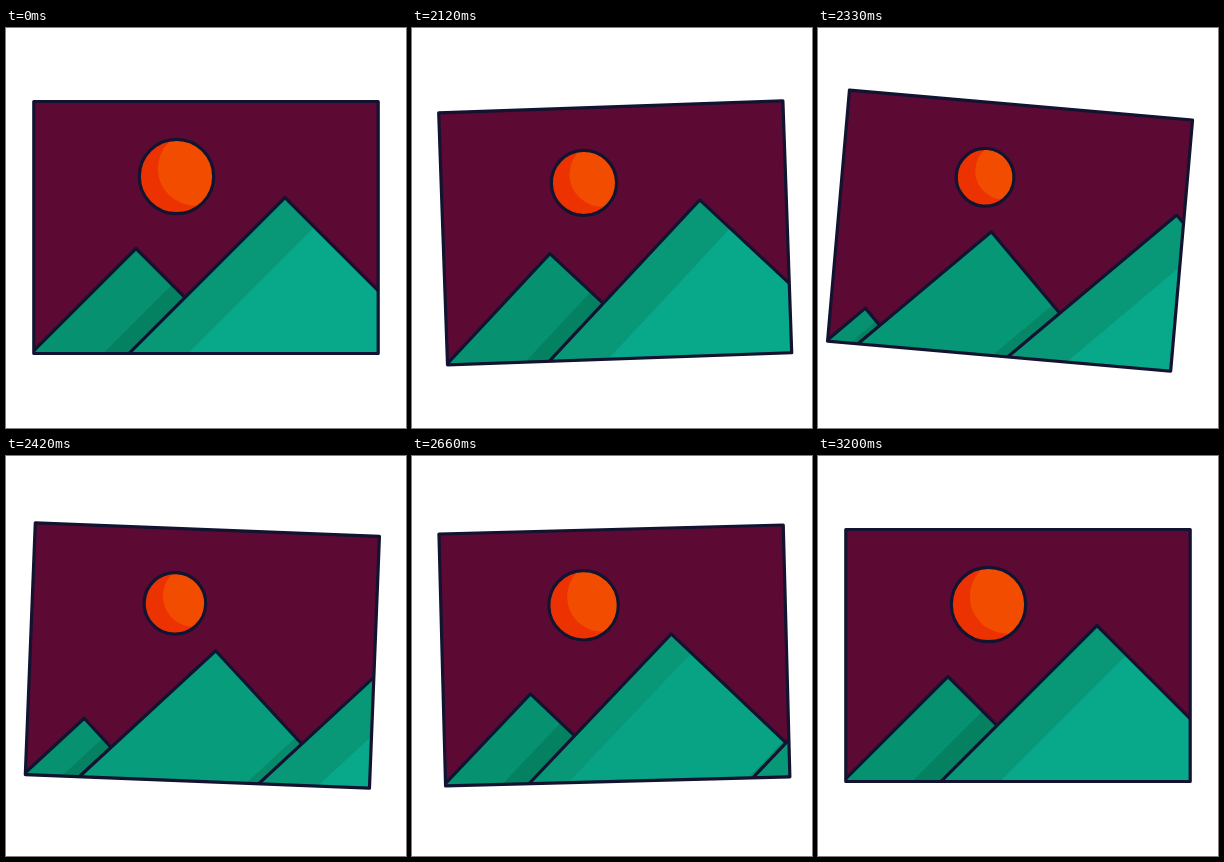
Recreate the animation shown at these times as an HTML page with a canvas. Size 400 by 400 pixels, loop 3230 ms.

```html
<!DOCTYPE html>
<html lang="en">
<head>
<meta charset="utf-8">
<title>Mountain picture</title>
<style>
  html, body { margin: 0; width: 100%; height: 100%; overflow: hidden; background: #fff; }
  canvas { display: block; width: 400px; height: 400px; }
</style>
</head>
<body>
<canvas id="stage" width="400" height="400"></canvas>
<script>
const ctx = document.getElementById('stage').getContext('2d');

const LOOP = 3230, REST = 2000, MOVE = 1200, STEP = 30;
const FRAME = { x: 27.8, y: 73.5, w: 344.4, h: 252 };
const FLOOR = FRAME.y + FRAME.h;
const PIVOT = { x: 200, y: 108 };
const SUN = { x: 170.5, y: 148.5, r: 37.2 };
const SMALL = { x: 130, y: 220.5 }, BIG = { x: 279, y: 169.5 };
const INK = '#121331', SKY = '#5c0a33';
const GREEN = {
  small: [6, 146, 113], smallShade: [4, 129, 97],
  big: [8, 168, 138], bigShade: [8, 152, 120]
};

const mix = (a, b, k) => a + (b - a) * k;
const rgb = (a, b = a, k = 0) => `rgb(${a.map((v, i) => Math.round(mix(v, b[i], k)))})`;
const swing = k => (1 - Math.cos(Math.PI * k)) / 2;

// Bezier easing with handles (x1, 0) and (x2, 1)
function bezier(x1, x2) {
  return k => {
    if (k <= 0) return 0;
    if (k >= 1) return 1;
    let lo = 0, hi = 1;
    for (let i = 0; i < 24; i++) {
      const s = (lo + hi) / 2, q = 1 - s;
      if (3 * q * q * s * x1 + 3 * q * s * s * x2 + s * s * s < k) lo = s; else hi = s;
    }
    return lo * lo * (3 - 2 * lo);
  };
}
const slide = bezier(0.4, 0.14), grow = bezier(0.28, 0.3), swell = bezier(0.17, 0.25);

// Keys are [time, value], with a smooth stop at each
function track(keys, t) {
  for (let i = 1; i < keys.length; i++) {
    const [t0, v0] = keys[i - 1], [t1, v1] = keys[i];
    if (t <= t1) return mix(v0, v1, swing((t - t0) / (t1 - t0)));
  }
  return keys[keys.length - 1][1];
}
const TILT = [[0, 0], [105, -2.1], [315, 5.05], [560, -2.1], [910, 1.05], [1200, 0]];
const DROP = [[0, 0], [205, 8.5], [430, 0]];

const sunRadius = t => t < 240
  ? mix(SUN.r, 28, swing(t / 240))
  : mix(28, SUN.r, swell((t - 240) / (MOVE - 240)));

function fillRightOf(base, color) {
  ctx.beginPath();
  ctx.moveTo(base - 20, FLOOR + 20);
  ctx.lineTo(base + 500, FLOOR - 500);
  ctx.lineTo(base + 500, FLOOR + 20);
  ctx.fillStyle = color;
  ctx.fill();
}

// left and right are the widths of the two slanted bands along the floor
function mountain({ x, y, left, right, edge, body, shade }) {
  const h = FLOOR - y, k = h + 10;
  const shape = new Path2D(`M${x - k} ${y + k}L${x} ${y}L${x + k} ${y + k}`);
  ctx.save();
  ctx.clip(shape);
  fillRightOf(x - h - 40, edge);
  fillRightOf(x - h + left, body);
  fillRightOf(x + h - right, shade);
  ctx.restore();
  ctx.stroke(shape);
}

function sun(r) {
  const disc = new Path2D();
  disc.arc(SUN.x, SUN.y, r, 0, Math.PI * 2);
  ctx.save();
  ctx.clip(disc);
  ctx.fillStyle = '#ec3200';
  ctx.fill(disc);
  ctx.beginPath();
  ctx.arc(SUN.x + 18.5, SUN.y - 8, r, 0, Math.PI * 2);
  ctx.fillStyle = '#f24c00';
  ctx.fill();
  ctx.restore();
  ctx.stroke(disc);
}

function mountains(t) {
  const u = slide(t / MOVE), g = grow(t / MOVE);
  if (u > 0) {
    mountain({
      x: mix(27, SMALL.x, u), y: mix(FLOOR, SMALL.y, u), left: -30, right: 141 * u,
      edge: rgb(GREEN.small), body: rgb(GREEN.small), shade: rgb(GREEN.smallShade)
    });
  }
  mountain({
    x: mix(SMALL.x, BIG.x, u), y: mix(SMALL.y, BIG.y, g),
    left: Math.max(-30, 59 - 136 * (1 - u)), right: 138 - 76 * u,
    edge: rgb(GREEN.small, GREEN.bigShade, u),
    body: rgb(GREEN.small, GREEN.big, u * u * 0.5 + u * 0.5),
    shade: rgb(GREEN.smallShade, GREEN.bigShade, u * 0.7)
  });
  if (u < 1) {
    mountain({
      x: BIG.x + 248 * u, y: BIG.y, left: 59, right: 60,
      edge: rgb(GREEN.bigShade), body: rgb(GREEN.big), shade: rgb(GREEN.bigShade)
    });
  }
}

function draw(t) {
  ctx.fillStyle = '#fff';
  ctx.fillRect(0, 0, 400, 400);
  ctx.save();
  ctx.translate(PIVOT.x, PIVOT.y + track(DROP, t));
  ctx.rotate(track(TILT, t) * Math.PI / 180);
  ctx.translate(-PIVOT.x, -PIVOT.y);
  ctx.lineWidth = 3.2;
  ctx.lineJoin = 'round';
  ctx.strokeStyle = INK;

  const border = new Path2D();
  border.rect(FRAME.x, FRAME.y, FRAME.w, FRAME.h);
  ctx.fillStyle = SKY;
  ctx.fill(border);
  ctx.save();
  ctx.clip(border);
  sun(sunRadius(t));
  mountains(t);
  ctx.restore();
  ctx.stroke(border);
  ctx.restore();
}

const start = performance.now();
function tick() {
  const time = (performance.now() - start) % LOOP;
  const step = Math.floor((time - REST) / STEP) * STEP;
  draw(Math.min(MOVE, Math.max(0, step)));
  requestAnimationFrame(tick);
}
tick();
</script>
</body>
</html>
```
